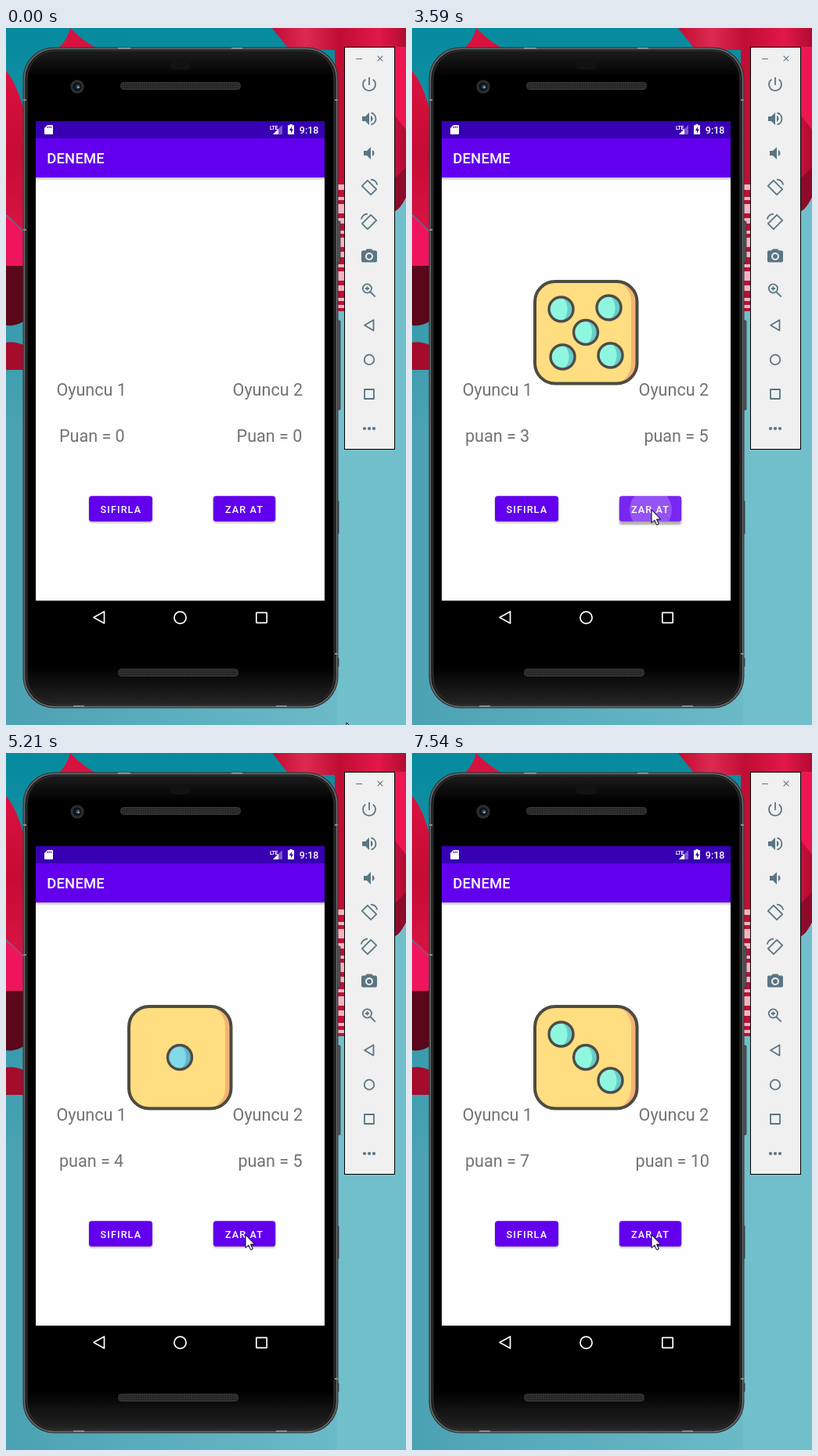
An HTML page that plays this animation: 511 by 891 pixels, repeating every 8 s.

```html
<!DOCTYPE html>
<html lang="tr">
<head>
<meta charset="utf-8">
<title>Zar</title>
<style>
html, body { margin: 0; width: 100%; height: 100%; overflow: hidden; background: #4a9fb0; }
svg { display: block; width: 511px; height: 891px; font-family: Roboto, "Noto Sans", sans-serif; }
.label { font-size: 21.55px; fill: #737373; }
.btn { font-size: 12.57px; font-weight: 500; letter-spacing: 1.12px; fill: #fff; }
.line { fill: none; stroke: #5a7583; stroke-width: 1.8; }
.solid { fill: #5a7583; }
.nav { fill: none; stroke: #fff; stroke-width: 1.7; stroke-linejoin: round; }
</style>
</head>
<body>
<svg viewBox="0 0 511 891">
  <defs>
    <linearGradient id="sky">
      <stop offset="0" stop-color="#4ba2b3"/>
      <stop offset="1" stop-color="#72bfcc"/>
    </linearGradient>
    <linearGradient id="skyTop" x1="0" y1="0" x2="0" y2="1">
      <stop offset="0" stop-color="#058a9e"/>
      <stop offset="1" stop-color="#058a9e" stop-opacity="0"/>
    </linearGradient>
    <linearGradient id="petal" x1="0" y1="0" x2="0" y2="1">
      <stop offset="0" stop-color="#d9123f"/>
      <stop offset=".5" stop-color="#c60c34"/>
      <stop offset="1" stop-color="#d91444"/>
    </linearGradient>
    <linearGradient id="topPetal">
      <stop offset="0" stop-color="#c20c32"/>
      <stop offset=".25" stop-color="#dc2a52"/>
      <stop offset=".5" stop-color="#c00d33"/>
      <stop offset=".8" stop-color="#e2174a"/>
      <stop offset="1" stop-color="#b00b30"/>
    </linearGradient>
    <linearGradient id="body" x1="0" y1="0" x2="0" y2="1">
      <stop offset="0" stop-color="#1c1c1c"/>
      <stop offset=".04" stop-color="#000"/>
      <stop offset=".94" stop-color="#000"/>
      <stop offset="1" stop-color="#242424"/>
    </linearGradient>
    <linearGradient id="barShadow" x1="0" y1="0" x2="0" y2="1">
      <stop offset="0" stop-color="#000" stop-opacity=".28"/>
      <stop offset="1" stop-color="#000" stop-opacity="0"/>
    </linearGradient>
    <pattern id="mesh" width="3" height="3" patternUnits="userSpaceOnUse">
      <rect width="3" height="3" fill="#2f2f2f"/>
      <circle cx="1.5" cy="1.5" r=".8" fill="#161616"/>
    </pattern>
    <filter id="soft" x="-20%" y="-40%" width="140%" height="200%"><feGaussianBlur stdDeviation="1.3"/></filter>
    <clipPath id="pressClip"><rect x="264.800" y="598.300" width="79.400" height="32.500" rx="3.600"/></clipPath>
    <clipPath id="dieClip"><rect x="157" y="324" width="130" height="130" rx="26"/></clipPath>
    <clipPath id="pipClip"><circle r="15"/></clipPath>
    <g id="pip">
      <circle r="15.5" fill="var(--dark)"/>
      <ellipse cx="-5" rx="13" ry="17" fill="var(--light)" clip-path="url(#pipClip)"/>
      <circle r="15.5" fill="none" stroke="#4e4c48" stroke-width="3.4"/>
    </g>
  </defs>

  <!-- wallpaper -->
  <rect width="511" height="891" fill="url(#sky)"/>
  <rect width="511" height="520" fill="url(#skyTop)"/>
  <rect x="423" y="215" width="88" height="676" fill="#72bfcc"/>
  <path d="M82 0Q78 16 66 27H118Q98 17 82 0Z" fill="#d8123f"/>
  <path d="M0 55Q14 70 24 110V262Q14 250 0 238Z" fill="url(#petal)"/>
  <path d="M0 240Q14 250 24 264V306H0Z" fill="#ef155d"/>
  <path d="M0 304H24V374Q12 382 0 380Z" fill="#5a0719"/>
  <path d="M0 402Q12 400 24 406V437H0Z" fill="#a50b2b"/>
  <path d="M340 0H511V216Q503 232 497 234L432 362H420V28H362Z" fill="url(#topPetal)"/>
  <path d="M511 24V130L497 112V24Z" fill="#ee1652"/>
  <path d="M511 178V216Q503 232 497 234V192Z" fill="#8d0a2a"/>
  <path d="M428 200V358" stroke="#f3b4c4" stroke-width="8" stroke-dasharray="7 9 4 5 12 6"/>

  <!-- phone -->
  <g fill="#55585a" stroke="#2c2e2f" stroke-width=".8">
    <rect x="421" y="247" width="6" height="53" rx="1"/>
    <rect x="421" y="374" width="6" height="114" rx="1"/>
    <rect x="421" y="605" width="4" height="41"/>
    <rect x="421" y="806" width="4" height="10"/>
  </g>
  <rect x="21.500" y="24.500" width="403" height="845" rx="40" fill="#343638"/>
  <rect x="23.500" y="26.500" width="399" height="841" rx="38.500" fill="#1d1e1f" stroke="#6a6c6e" stroke-width="1.500"/>
  <rect x="27" y="29" width="392" height="836" rx="36" fill="url(#body)" stroke="#343536"/>
  <path d="M22 92h4M22 258h4M420 92h4M420 800h4M143 26h16M288 26h14M86 867h14M345 867h14" stroke="#8b8d8e" stroke-width="2"/>
  <rect x="209" y="43" width="27" height="10" rx="5" fill="#121212"/>
  <circle cx="91" cy="75" r="8.700" fill="#2b2d2f"/>
  <circle cx="91" cy="75" r="5.500" fill="#0e1319"/>
  <circle cx="92" cy="75" r="2.600" fill="#39566a"/>
  <circle cx="92.500" cy="76" r="1" fill="#b4cad6"/>
  <rect x="146.500" y="69.500" width="153" height="9" rx="4" fill="url(#mesh)" stroke="#3a3a3a"/>
  <rect x="143.500" y="819.500" width="153" height="9" rx="4" fill="url(#mesh)" stroke="#3a3a3a"/>

  <!-- app -->
  <rect x="38" y="119" width="369" height="613" fill="#fefefe"/>
  <rect x="38" y="191" width="369" height="4" fill="url(#barShadow)"/>
  <rect x="38" y="141" width="369" height="50" fill="#6200ee"/>
  <rect x="38" y="119" width="369" height="22" fill="#3700b3"/>
  <g fill="#fff">
    <path d="M53 124H59Q60 124 60 125V135Q60 136 59 136H50Q49 136 49 135V128Z"/>
    <path d="M53.500 125.500v2.500M55.600 125.500v2.500M57.700 125.500v2.500" stroke="#3700b3"/>
    <path d="M353 124V136H341Z" opacity=".35"/>
    <path d="M348 129V136H341Z"/>
    <text x="337" y="129.500" font-size="6.800" font-weight="700" letter-spacing="-.4">LTE</text>
    <path d="M362.500 123H365.500V124.300H368V136H360V124.300H362.500Z"/>
    <path d="M365 126 362 131H364V134.500L367 129.500H365Z" fill="#3700b3"/>
    <text x="374.800" y="134.500" font-size="12.500" font-weight="500">9:18</text>
    <text x="52.300" y="173" font-size="18.400" font-weight="500" letter-spacing=".2">DENEME</text>
  </g>
  <g class="nav">
    <path d="M112 753.500 125.500 746V761Z"/>
    <circle cx="222.500" cy="753.700" r="7.600"/>
    <rect x="319.800" y="747.300" width="13.400" height="13" rx=".5"/>
  </g>

  <g id="die" visibility="hidden">
    <rect x="157" y="324" width="130" height="130" rx="26" fill="#f3b376"/>
    <rect x="145" y="322" width="135" height="134" rx="27" fill="#fede80" clip-path="url(#dieClip)"/>
    <rect x="157" y="324" width="130.500" height="130.500" rx="26" fill="none" stroke="#4e4b40" stroke-width="4"/>
    <g id="pips"></g>
  </g>

  <g class="label">
    <text x="64.400" y="470.300">Oyuncu 1</text>
    <text x="289.600" y="470.300">Oyuncu 2</text>
    <text id="left" x="68" y="528.800"></text>
    <text id="right" y="528.800"></text>
  </g>

  <rect x="106" y="599.800" width="81" height="32.500" rx="3.600" opacity=".3" filter="url(#soft)"/>
  <rect x="106" y="598.300" width="81" height="32.500" rx="3.600" fill="#6200ee"/>
  <text class="btn" x="120.600" y="619.600">SIFIRLA</text>
  <rect id="shade" x="264.800" width="79.400" height="32.500" rx="3.600" opacity=".3" filter="url(#soft)"/>
  <g clip-path="url(#pressClip)">
    <rect x="264" y="598" width="81" height="34" fill="#6200ee"/>
    <rect id="glow" x="264" y="598" width="81" height="34" fill="#fff"/>
    <circle id="ripple" cx="305" cy="616" fill="#fff" opacity=".21"/>
  </g>
  <text class="btn" x="280" y="619.600">ZAR AT</text>

  <!-- side toolbar -->
  <rect x="432.500" y="24.500" width="64" height="514" fill="#f0f0f0" stroke="#000"/>
  <path class="line" style="stroke-width:1.100" d="M447 39.500h8M474.700 35.700l6.600 6.600M481.300 35.700l-6.600 6.600"/>
  <g id="tools" stroke-linejoin="round"></g>

  <path id="cursor" d="M0 0V16.500L3.800 13 6.600 19.200 9.300 18 6.500 12H11.600Z" fill="#fff" stroke="#000" stroke-linejoin="round"/>
</svg>
<script>
const LOOP = 8000;
const $ = id => document.getElementById(id);

// toolbar icons, drawn around their own centre: [y, stroked path, filled path, mirrored]
const speaker = 'M-9 -3V3H-5L0 8V-8L-5 -3Z';
const rotate = 'M9.200 2.100 2.100 9.200 -9.200 -2.100 -2.100 -9.200ZM2 -10.300Q8.500 -10 10.300 -3.500';
const tools = [
  [72, 'M0 -9V1M-4.800 -6.200A8 8 0 1 0 4.800 -6.200', ''],
  [116, 'M2.500 -7.500A7.700 7.700 0 0 1 2.500 7.500', speaker + 'M2 -4A4.400 4.400 0 0 1 2 4Z'],
  [160, '', 'M-7 -3V3H-3L2 8V-8L-3 -3ZM4 -4A4.400 4.400 0 0 1 4 4Z'],
  [204, rotate, ''],
  [248, rotate, '', true],
  [291.5, '', 'M-3 -9H3L5 -7H8Q10 -7 10 -5V6Q10 8 8 8H-8Q-10 8 -10 6V-5Q-10 -7 -8 -7H-5Z'],
  [336, 'M3 -3A5.600 5.600 0 1 1 -8.200 -3A5.600 5.600 0 1 1 3 -3M1.600 1.500 7.800 7.700M-5.200 -3H0M-2.600 -5.600V-.400', ''],
  [380, 'M-6 0 5.500 -6.700V6.700Z', ''],
  [424, 'M6.300 0A6.300 6.300 0 1 1 -6.300 0A6.300 6.300 0 1 1 6.300 0', ''],
  [468, 'M-6 -6H6V6H-6Z', '']
];
$('tools').innerHTML = tools.map(([y, line, solid, mirrored]) =>
  `<g transform="translate(464 ${y}) scale(${mirrored ? -1 : 1} 1)">` +
  `<path class="line" d="${line}"/><path class="solid" d="${solid}"/></g>`
).join('') +
  '<circle cx="464" cy="292" r="4" fill="#5a7583" stroke="#f0f0f0" stroke-width="2"/>' +
  [458, 464, 470].map(x => `<circle class="solid" cx="${x}" cy="512" r="2.100"/>`).join('');

const faces = {
  1: [[222, 389]],
  3: [[190.5, 359.5], [222, 389], [253.5, 418.5]],
  5: [[190.5, 359.5], [251.5, 357.5], [222, 389], [192.5, 420.5], [253.5, 418.5]]
};

// [time, die face, score 1, score 2, x of score 2]
const rolls = [
  [0, 0, 'Puan = 0', 'Puan = 0', 294.6],
  [2460, 3, 'puan = 3', 'Puan = 0', 294.6],
  [3590, 5, 'puan = 3', 'puan = 5', 296.4],
  [4700, 1, 'puan = 4', 'puan = 5', 296.4],
  [5930, 5, 'puan = 4', 'puan = 10', 285.6],
  [7030, 3, 'puan = 7', 'puan = 10', 285.6]
];

// button looks at 100 ms steps: [glow, ripple radius, raised]
const fade = [.36, .28, .21, .14, .07, 0].map(a => [a, 0, 0]);
const slowTap = [[.05, 9, 0], [.1, 18, 1], [.15, 27, 1], [.36, 0, 1], [.24, 0, 0], [.12, 0, 0], [.05, 0, 0], [0, 0, 0]];
const quickTap = [[.07, 12, 0], [.15, 27, 1], ...fade];
const taps = [
  [1980, [[0, 9, 0], [0, 12, 0]]],
  [2460, fade],
  [3390, slowTap],
  [4500, slowTap],
  [5730, quickTap],
  [6830, slowTap]
];

const path = [[435, 888], [430, 868], [405, 820], [360, 760], [315, 710], [280, 675],
  [265, 652], [279, 634], [297, 621], [306, 616]];

const latest = (rows, t) => rows.filter(r => r[0] <= t).pop();
let shown;

function showRoll(roll) {
  if (roll === shown) return;
  shown = roll;
  const [, face, a, b, x] = roll;
  $('die').setAttribute('visibility', face ? 'visible' : 'hidden');
  $('pips').style.cssText = face === 1
    ? '--light:#82d9e8;--dark:#62b5ca' : '--light:#8ff7df;--dark:#68cec8';
  $('pips').innerHTML = (faces[face] || []).map(([px, py]) =>
    `<use href="#pip" x="${px}" y="${py}"/>`).join('');
  $('left').textContent = a;
  $('right').textContent = b;
  $('right').setAttribute('x', x);
}

function showButton(t) {
  const [start, looks] = latest(taps, t) || [0, [[0, 0, 0]]];
  const step = Math.min(Math.floor((t - start) / 90), looks.length - 1);
  const [glow, radius, raised] = looks[Math.min(step, Math.ceil((t - start + 1) / 100) - 1)];
  $('glow').setAttribute('opacity', glow);
  $('ripple').setAttribute('r', radius);
  $('shade').setAttribute('y', raised ? 602.5 : 599.8);
}

function render(t) {
  showRoll(latest(rolls, t));
  showButton(t);
  const step = t < 100 ? 0 : Math.min(9, 1 + Math.floor((t - 100) / 95));
  $('cursor').setAttribute('transform', `translate(${path[step]})`);
}

const origin = performance.now();
function tick() {
  render((performance.now() - origin) % LOOP);
  requestAnimationFrame(tick);
}
tick();
</script>
</body>
</html>
```
